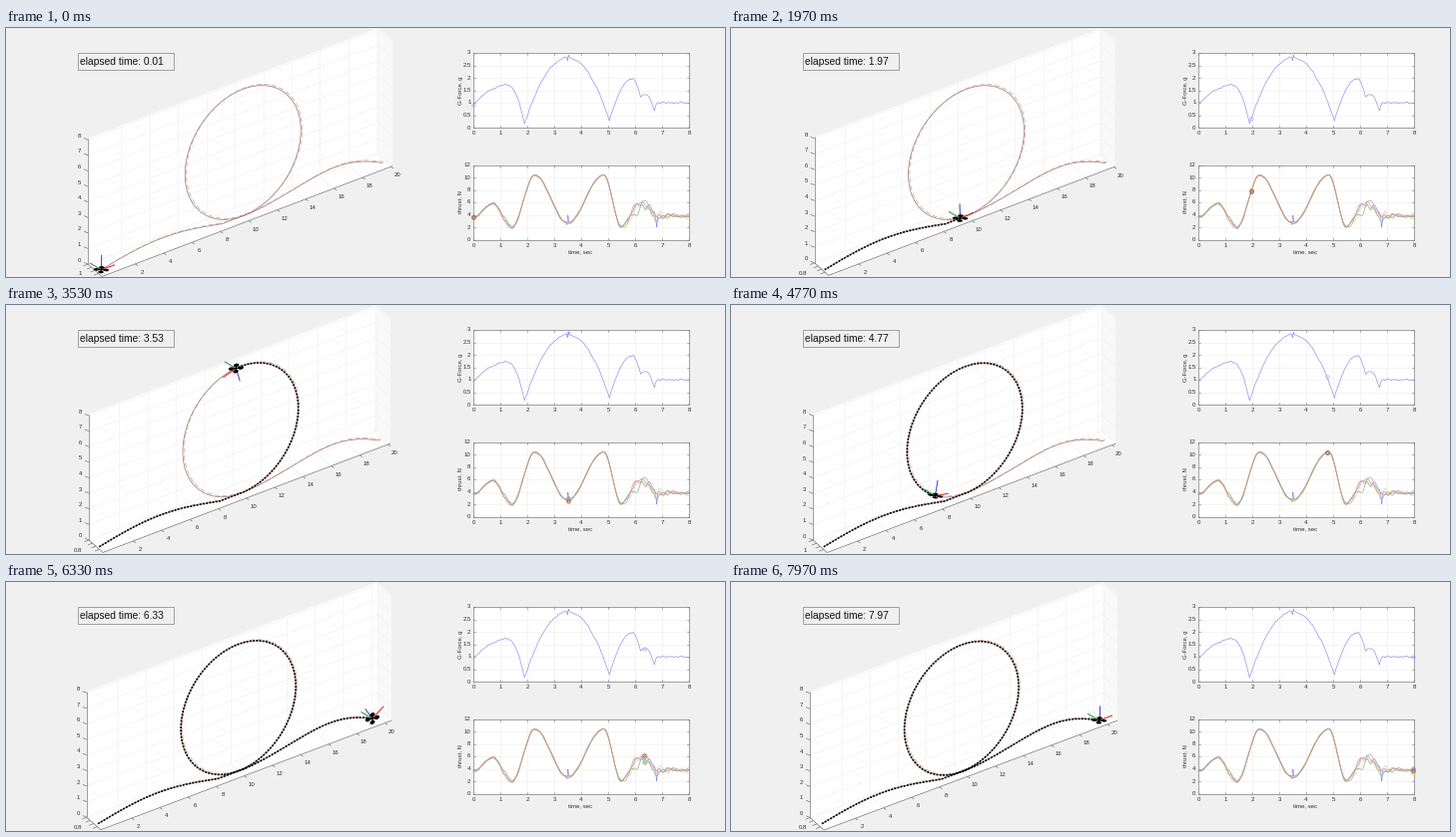
These frames come from a looping animation (720x250 px, 8.01 s). A matplotlib script:

```python
import numpy as np
import matplotlib.pyplot as plt
from matplotlib.animation import FuncAnimation
from matplotlib.collections import LineCollection, PolyCollection
from matplotlib.patches import Rectangle

W, H = 720, 250
TICK_MS, TICKS, FPS = 30, 267, 30
LAST = 239
PX = 0.72  # points per pixel at 100 dpi
INK = "#303030"
EDGE = "#808080"
GRID = "#ededed"

plt.rcParams["font.family"] = "Liberation Sans"
fig = plt.figure(figsize=(7.2, 2.5), dpi=100, facecolor="#f0f0f0")
ax = fig.add_axes([0, 0, 1, 1])
ax.set(xlim=(0, W), ylim=(H, 0))
ax.axis("off")


def text(x, y, s, size=6, ha="center", color=INK, va="center", **kw):
    return ax.text(x, y, s, fontsize=size * PX, ha=ha, va=va, color=color, **kw)


def line(x=(), y=(), color=EDGE, lw=0.6, **kw):
    return ax.plot(x, y, color=color, lw=lw * PX, **kw)[0]


def box(x, y, w, h, z, fc="none", ec="none"):
    ax.add_patch(Rectangle((x, y), w, h, fc=fc, ec=ec, lw=0.7 * PX, zorder=z))


def segments(color, lw, z):
    col = LineCollection([], colors=color, linewidths=lw * PX, zorder=z)
    return ax.add_collection(col, autolim=False)


def polygons(color, z):
    col = PolyCollection([], facecolors=color, edgecolors="none", zorder=z)
    return ax.add_collection(col, autolim=False)


# ---- flight path -------------------------------------------------------
ENTER, LEAVE, STOP = 2.0, 4.97, 6.72
RADIUS, MID, END = 4.08, 9.97, 19.8


def progress(t, start, stop):
    return np.clip((t - start) / (stop - start), 0, 1)


def position(t):
    """Position (x, z) in the vertical plane at time t."""
    t = np.asarray(t, float)
    x_in = MID * progress(t, 0, ENTER) ** 2.55
    z_in = 0.55 * np.sin(np.pi * progress(x_in, 0, 8.5))

    a = 2 * np.pi * progress(t, ENTER, LEAVE)
    a = a + 0.25 * np.sin(a)
    x_loop = MID + RADIUS * np.sin(a)
    z_loop = RADIUS * (1 - np.cos(a))

    x_out = MID + (END - MID) * (1 - (1 - progress(t, LEAVE, STOP)) ** 2.3)
    z_out = 0.88 * np.sin(np.pi * progress(x_out, 10.3, END) ** 1.6)

    phase = [t < ENTER, t < LEAVE]
    return (np.select(phase, [x_in, x_loop], x_out),
            np.select(phase, [z_in, z_loop], z_out))


def pitch(t):
    """Nose down to speed up, one full turn, nose up to brake."""
    dive = -58 * np.sin(np.pi * progress(t, 0, 1.95))
    turn = 360 * progress(t, 1.95, 4.85)
    brake = 45 * np.sin(np.pi * progress(t, 4.85, 6.85))
    return np.radians(dive + turn + brake)


# ---- slowly drifting camera --------------------------------------------
EZ = np.array([0, -15.6])
EY = np.array([-12, -7])
BACK = np.array([-8.5, -7.5])
FRONT = np.array([5.5, 5])
TOP = 8.1


class View:
    def __init__(self, t):
        drift, jolt = (t / 8) ** 2, np.exp(-4 * t)
        self.o = np.array([94 - 3 * drift + 1.5 * jolt, 242.7])
        self.ex = np.array([14.22 - 0.2 * drift, -5.42 + 0.18 * drift])
        left = 84 - 5 * drift - 2 * jolt
        right = 384.5 + 2.5 * (drift + jolt)
        self.x0 = (left - self.o[0] - BACK[0]) / self.ex[0]
        self.x1 = (right - self.o[0] - FRONT[0]) / self.ex[0]

    def at(self, x, z, shift=0):
        return self.o + shift + np.multiply.outer(x, self.ex) + np.multiply.outer(z, EZ)

    def back(self, x, z):
        return self.at(x, z, BACK)

    def front(self, x, z):
        return self.at(x, z, FRONT)


# ---- right-hand plots --------------------------------------------------
T = np.linspace(0, 8, 801)
rng = np.random.default_rng(4)


def wave(turns, ease):
    """Join turning points; ease runs from each upper point to the lower one."""
    y = np.full(T.size, float(turns[-1][1]))
    for (t0, y0), (t1, y1) in zip(turns, turns[1:]):
        on = (T >= t0) & (T < t1)
        u = (T[on] - t0) / (t1 - t0)
        y[on] = y0 + (y1 - y0) * (ease(u) if y0 > y1 else 1 - ease(1 - u))
    return y


def wobble(width):
    k = np.hanning(width)
    n = np.convolve(rng.normal(size=T.size + width - 1), k, "valid")
    return n / n.std()


def bump(center, width):
    return np.exp(-((T - center) / width) ** 2)


g_force = wave([(0, .93), (1.28, 1.7), (1.9, .15), (3.52, 2.82), (5.05, .26),
                (5.9, 1.95), (6.2, 1.22), (6.35, 1.35), (6.72, .68), (6.85, 1)],
               lambda u: u ** 2)
g_force += 0.018 * wobble(15) + 0.1 * bump(3.53, .015) - 0.12 * bump(3.49, .015)

base = wave([(0, 3.6), (.72, 5.85), (1.42, 1.9), (2.27, 10.35), (3.5, 2.7),
             (4.83, 10.4), (5.5, 2.1), (6.2, 5.5), (6.9, 3.7)],
            lambda u: (1 - np.cos(np.pi * u)) / 2)
loose = 0.08 + 0.22 * bump(1.2, .35) + 0.5 * bump(6.2, .5) + 0.15 * (T > 6.7)
MOTORS = ["#8888ee", "#e8cc80", "#78b488", "#e48c78"]
thrust = [base + loose * wobble(31) for _ in MOTORS]
thrust[0] += 1.2 * bump(3.51, .02) - 0.4 * bump(3.47, .02) - 1.8 * bump(6.8, .025)


class Panel:
    left, width, height = 468, 216, 75

    def __init__(self, top, ymax, step, label):
        self.bottom, self.ymax = top + self.height, ymax
        x0, x1, y0 = self.left, self.left + self.width, self.bottom
        box(x0, top, self.width, self.height, 1, fc="white")
        for v in range(9):
            x = self.x(v)
            line([x, x], [y0, top], GRID, zorder=1.1)
            line([x, x], [y0, y0 - 2], zorder=1.2)
            line([x, x], [top, top + 2], zorder=1.2)
            text(x, y0 + 5.5, str(v))
        for v in np.arange(0, ymax + step / 2, step):
            y = self.y(v)
            line([x0, x1], [y, y], GRID, zorder=1.1)
            line([x0, x0 + 2], [y, y], zorder=1.2)
            line([x1, x1 - 2], [y, y], zorder=1.2)
            text(x0 - 2.5, y, f"{v:g}", ha="right")
        box(x0, top, self.width, self.height, 1.3, ec=EDGE)
        text(455, top + self.height / 2, label, rotation=90)

    def x(self, t):
        return self.left + np.asarray(t) * self.width / 8

    def y(self, v):
        return self.bottom - np.asarray(v) * self.height / self.ymax

    def plot(self, values, color, alpha=1):
        line(self.x(T), self.y(values), color, 0.65, zorder=2)
        mark = line([], [], color, marker="o", ms=3.4 * PX, mfc="none",
                    mew=0.8 * PX, alpha=alpha, zorder=3)
        return self, values, mark


g_panel = Panel(25, 3, 0.5, "G-Force, g")
n_panel = Panel(137.5, 12, 2, "thrust, N")
text(575.5, 224.5, "time, sec")
marks = [g_panel.plot(g_force, "#8c8cee", 0.6)]
marks += [n_panel.plot(v, c) for v, c in zip(thrust, MOTORS)]
marks[-1][2].set_color("#c04438")

# ---- 3D scene ----------------------------------------------------------
walls = polygons(["#fefefe", "#f9f9f9", "#fefefe"], 1)
grid = segments("#f2f2f2", 0.6, 1.1)
frame = segments("#707070", 0.65, 1.2)
path = line(color="#857c80", lw=0.7, zorder=2)
plan = line(color="#e2908a", lw=0.7, zorder=2.1, dashes=(7, 4))
trail = line(color="black", lw=1.7, zorder=3, ls=(0, (1.1, 0.8)),
             dash_capstyle="butt")
triad = segments(["#e03030", "#30a050", "#5050c0"], 1.1, 4)
arms = segments("black", 1.2, 4.1)
rotors = polygons("black", 4.2)

x_labels = {v: text(0, 0, str(v)) for v in range(2, 21, 2)}
z_labels = {v: text(0, 0, str(v)) for v in range(9)}
y_label = text(76, 247, "", ha="right")

box(72, 25, 96, 17, 5, fc="#f0f0f0", ec=EDGE)
clock = text(74.3, 36.7, "", 10.25, ha="left", color="#101010", va="baseline", zorder=6)

PATH_X, PATH_Z = position(np.linspace(0, 7, 700))
RING = np.linspace(0, 2 * np.pi, 14)
HUBS = [(x, y) for x in (.19, -.19) for y in (.19, -.19)]


def draw_box(v, t):
    a, b, back, front = v.x0, v.x1, v.back, v.front
    walls.set_verts([
        [back(a, 0), back(a, TOP), back(b, TOP), back(b, 0)],
        [back(b, 0), back(b, TOP), front(b, TOP), front(b, 0)],
        [back(a, 0), back(b, 0), front(b, 0), front(a, 0)]])

    lines = [[back(b, 0), back(b, TOP)]]
    for z in z_labels:
        lines += [[back(a, z), back(b, z)], [back(b, z), front(b, z)]]
    for x in x_labels:
        lines += [[back(x, 0), back(x, TOP)], [back(x, 0), front(x, 0)]]
    grid.set_segments(lines)

    edges = [[back(a, 0), back(a, TOP)], [front(a, 0), front(b, 0)],
             [back(a, 0), front(a, 0)]]
    for x, label in x_labels.items():
        p = front(x, 0)
        edges.append([p, p + (2.6, 1.8)])
        label.set_position(p + (7, 8.5))
    for z, label in z_labels.items():
        p = back(a, z)
        edges.append([p, p - (4, 1.7)])
        label.set_position(p - (8.5, 4))
    for f in (0, .25, .5, .75):
        p = back(a, 0) + f * (FRONT - BACK)
        edges.append([p, p + (-4.5, 1.8)])
    frame.set_segments(edges)
    y_label.set_text("1" if t < 0.4 or 4.3 < t < 5.3 else "0.8")


def draw_quad(v, t):
    c = v.at(*position(t))
    s, k = np.sin(pitch(t)), np.cos(pitch(t))
    bx, bz = k * v.ex + s * EZ, k * EZ - s * v.ex
    triad.set_segments([[c, c + 0.95 * e] for e in (bx, EY, bz)])
    hubs = [c + x * bx + y * EY for x, y in HUBS]
    arms.set_segments([[hubs[0], hubs[3]], [hubs[1], hubs[2]]])
    disc = 0.15 * (np.outer(np.cos(RING), bx) + np.outer(np.sin(RING), EY))
    rotors.set_verts([h + disc for h in hubs])


def update(i):
    step = min(int((TICK_MS * i + 23.4) * FPS / 1000), LAST)
    t = max(step / FPS, 0.01)
    v = View(t)
    draw_box(v, t)
    path.set_data(*v.at(PATH_X, PATH_Z).T)
    plan.set_data(*v.at(PATH_X + 0.09, PATH_Z + 0.04).T)
    flown = np.linspace(0, t, 4 * step + 2)
    trail.set_data(*v.at(*position(flown)).T)
    draw_quad(v, t)
    for panel, values, mark in marks:
        mark.set_data([panel.x(t)], [panel.y(np.interp(t, T, values))])
    clock.set_text(f"elapsed time: {t:.2f}")
    return []


anim = FuncAnimation(fig, update, frames=TICKS, interval=TICK_MS,
                     repeat=True, repeat_delay=0)
plt.show()
```
